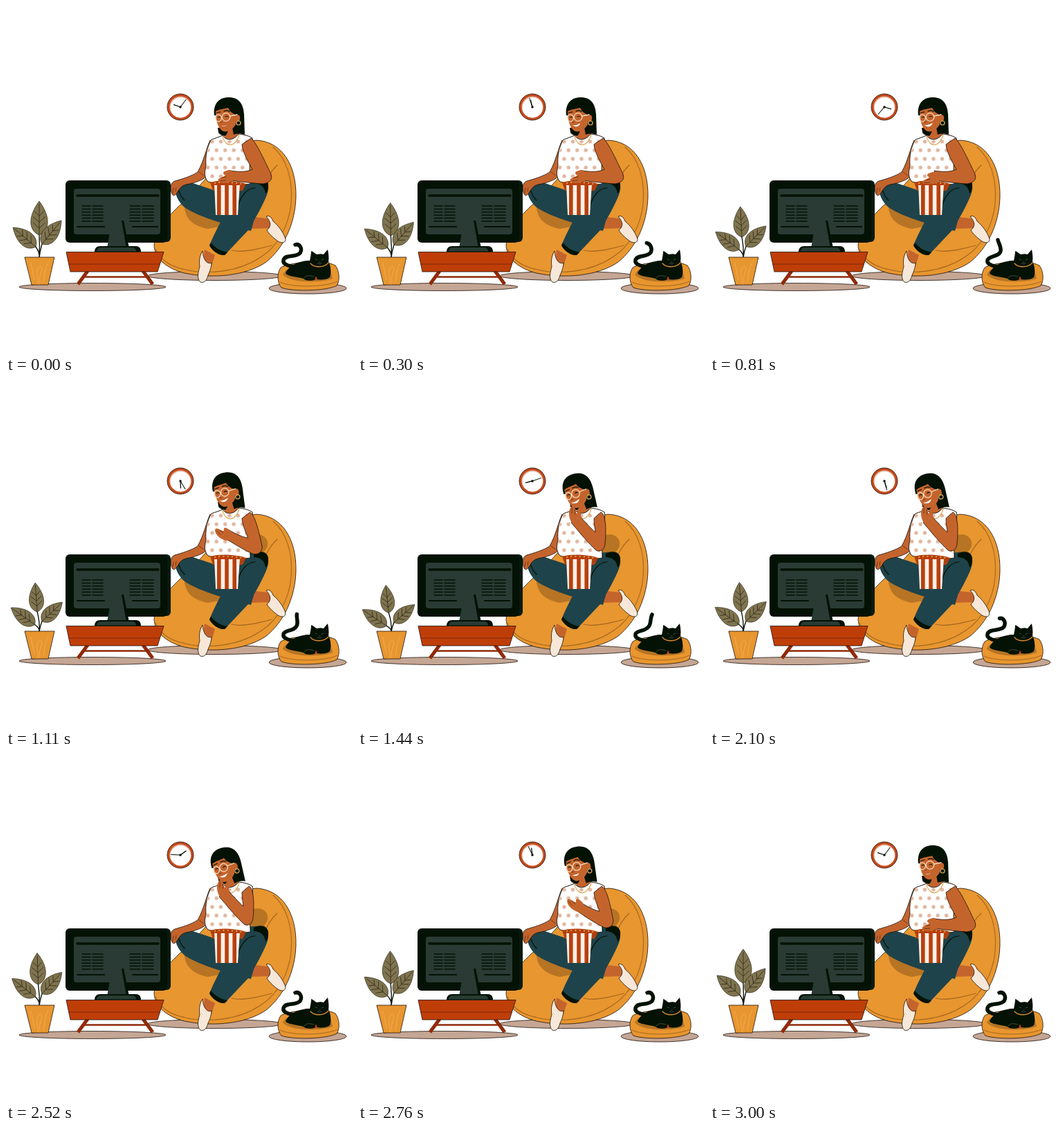
Recreate the animation shown at these times as an HTML page. Size 500 px wide and 500 px high, loop 3.18 s.

```html
<!DOCTYPE html>
<html lang="en">
<head>
<meta charset="utf-8">
<title>Evening at home</title>
<style>
html, body { margin: 0; width: 100%; height: 100%; overflow: hidden; background: #fff; }
svg { display: block; width: 100vw; height: 100vh; }
.edge { stroke: #1c1108; stroke-width: .8; }
.line { fill: none; stroke-linecap: round; stroke-linejoin: round; }
.skin { fill: #c4642d; }
.ink { fill: #031204; }
.bag { fill: #e8962f; }
.jeans { fill: #1e434a; }
.shade { fill: #c5a694; }
.shoe { fill: #f6e7d8; }
.leaf path { vector-effect: non-scaling-stroke; }
</style>
</head>
<body>
<svg viewBox="0 0 500 500">
  <defs>
    <pattern id="dots" width="12.5" height="25" patternUnits="userSpaceOnUse" x="291.700" y="214.700">
      <g fill="#e0b69f">
        <circle cx="6.25" cy="6.25" r="2.7"/>
        <circle cx="0" cy="18.75" r="2.7"/><circle cx="12.5" cy="18.75" r="2.7"/>
      </g>
    </pattern>
    <clipPath id="cup"><path d="M301 257 L338 257 L335 302 L303 302 Z"/></clipPath>
  </defs>

  <g class="shade edge">
    <ellipse cx="125" cy="406" rx="106" ry="5.5"/>
    <ellipse cx="302" cy="390" rx="97" ry="6.5"/>
    <ellipse cx="436" cy="408" rx="56" ry="8"/>
  </g>

  <!-- clock -->
  <circle class="edge" cx="252" cy="146" r="19" fill="#c5481a"/>
  <circle cx="252" cy="146" r="15.6" fill="#e5b9a2"/>
  <circle cx="252.3" cy="146.8" r="14.6" fill="#fff"/>
  <g class="line" stroke="#031204">
    <path id="long" d="M252 146 V132.5" stroke-width="1"/>
    <path id="short" d="M252 146 V136" stroke-width="1.3"/>
  </g>
  <circle class="ink" cx="252" cy="146" r="1.7"/>

  <!-- bean bag -->
  <path class="bag edge" d="M362 194 C399 196 420 230 419 276 C418 314 402 349 376 370 C346 391 296 394 258 386 C234 380 215 366 214 346 C215 324 235 302 260 280 C300 240 330 196 362 194 Z"/>
  <path fill="#b77424" d="M258 291 C259 307 270 318 292 322 L318 317 L318 292 Z"/>
  <path fill="#b77424" d="M357 224 C369 220 380 228 378 239 C376 249 366 254 350 256 Z"/>
  <g class="line" stroke="#a4661f" stroke-width="1.1">
    <path d="M386 204 C405 220 415 250 412 285 C409 318 392 348 368 363 C335 385 290 389 255 380"/>
    <path d="M392 230 C382 239 376 250 372 263"/>
    <path d="M384 346 C362 352 340 357 326 353"/>
    <path d="M216 351 C223 367 236 376 256 380"/>
  </g>

  <!-- plant -->
  <path id="stem" class="line" stroke="#10180c" stroke-width="1.4"/>
  <g id="leaves"></g>
  <path class="edge" fill="#e8962f" d="M27 363 H70 L61 403 H37 Z"/>
  <path class="line" stroke="#f0ad58" stroke-width=".9" d="M36 372 L41 396 M61 371 C55 380 57 388 54 399 M47 402 C44 388 43 378 50 376 C56 380 46 388 49 399"/>

  <!-- bench -->
  <g class="line" stroke="#8f2a08" stroke-width="5">
    <path d="M118 383 L104 402 M198 383 L212 402" stroke-linecap="butt"/>
    <path d="M112 391.500 H205" stroke-width="2.4"/>
  </g>
  <path class="edge" fill="#bf3e08" d="M87 355.500 H228 L219 384 H93 Z"/>
  <path class="line" stroke="#7c260a" stroke-width="1" d="M91 373 H222"/>

  <!-- television -->
  <rect x="94" y="252" width="144" height="89" rx="6" fill="#071a10"/>
  <rect class="ink" x="86" y="252" width="147" height="90" rx="6"/>
  <rect x="98" y="264" width="125" height="66" rx="4" fill="#293b34"/>
  <g class="line" stroke="#031204">
    <path stroke-width="3.4" d="M103 274 H220"/>
    <path stroke-width="2" d="M103 319 H142 M183 319 H219"/>
    <path id="vents" stroke-width="1.5"/>
  </g>
  <path fill="#293b34" d="M153 310 H170 L177 350 H146 Z"/>
  <path class="ink" d="M167 310 H170 L178 350 H174 Z"/>
  <path class="ink" d="M128 355.500 C128 350 131 347 136 347 H188 C193 347 195 351 195 355.500 Z"/>
  <path fill="#293b34" d="M131 354.500 C131 351 134 349 138 349 H181 C186 349 188 351 188 354.500 Z"/>

  <!-- legs -->
  <path class="skin" d="M350 304 L378 307 L386 321 L350 322 Z"/>
  <path class="shoe edge" d="M376 304 C381 302 384 306 386 311 C394 318 401 327 404 337 C404 343 398 343 393 340 C386 335 379 328 377 324 C383 319 384 313 376 304 Z"/>
  <path class="jeans" d="M245 258 C248 250 256 250 264 254 L300 266 L350 266 L360 304 L354 325 C325 318 280 306 258 291 C247 281 243 270 245 258 Z"/>
  <path class="line" stroke="#031204" stroke-width="1.1" d="M250 254 C247 262 250 273 258 281"/>
  <path class="skin" d="M287 352 L302 360 L296 379 L284 374 Z"/>
  <path class="shoe edge" d="M284 354 C279 362 279 370 280 377 C277 386 276 395 281 399 C287 401 290 396 292 389 C295 383 297 376 297 371 C291 374 285 367 284 354 Z"/>
  <path class="jeans" d="M320 258 C340 251 360 247 373 249 C381 253 380 266 377 273 C371 288 361 306 350 324 L316 360 C308 361 298 354 294 346 C301 329 311 309 320 296 Z"/>
  <path class="ink" d="M358 251 C368 246 378 248 379 258 C379 266 377 270 375 271 C374 261 367 256 358 256 Z"/>
  <path class="line" stroke="#031204" stroke-width="1.2" d="M335 290 C339 274 349 263 360 263"/>
  <path class="ink" d="M296 342 C302 349 309 354 320 356 L316 360 C308 361 298 354 294 346 Z"/>

  <!-- resting arm -->
  <path class="skin edge" d="M295 194 C290 204 286 224 277 240 C268 246 254 250 244 253 C238 255 237 262 239 269 C240 275 244 275 247 270 C250 266 252 260 260 258 C273 256 286 251 291 245 C296 234 302 215 303 200 Z"/>
  <path class="line" stroke="#6a3112" stroke-width=".8" d="M279 240 L286 245 M242 263 L241 270 M246 262 L245 268"/>

  <!-- torso -->
  <path class="ink" d="M306 176 H330 V184 C324 190 311 189 307 183 Z"/>
  <path class="skin" d="M321 176 L335 173 L338 191 C330 200 319 198 313 190 C318 188 321 184 321 176 Z"/>
  <path id="top" class="edge" fill="#fff" d="M297 193 C303 191 309 189 313 187 C318 195 329 195 336 185 C343 186 350 187 356 191 C358 204 353 218 352 232 L353 257 C333 260 312 259 292 254 C286 247 287 240 289 232 C288 218 290 204 297 193 Z"/>
  <use href="#top" style="fill: url(#dots)"/>
  <path fill="url(#dots)" d="M297 193 L314 188 C319 196 329 196 336 187 L355 191 C358 204 353 218 352 232 L352 256 C333 259 312 258 292 253 C287 247 287 240 289 232 C288 218 290 204 297 193 Z"/>
  <path class="line" stroke="#dba657" stroke-width="1.2" d="M313 188 C315 199 323 203 329 199 C334 195 336 190 337 186"/>

  <!-- head -->
  <g id="head">
    <path class="ink" d="M301 158 C299 142 307 132 322 132 C337 132 343 142 344 156 L345 186 C340 184 334 184 329 186 L324 160 Z"/>
    <path class="skin" d="M303 151 C309 147 316 147 322 145 C329 149 332 155 334 160 L332 171 C328 178 321 183 314 181 C307 178 303 167 303 151 Z"/>
    <ellipse class="skin" cx="335" cy="162" rx="3.2" ry="4.800"/>
    <path class="ink" d="M301 153 C304 142 314 138 322 142 C328 146 333 151 333 158 C327 155 323 152 321 147 C314 149 308 149 301 153 Z"/>
    <g class="line">
      <path stroke="#031204" stroke-width="1.2" d="M304.500 154.500 L310 153 M315 152 Q319 150 323 152.500"/>
      <path stroke="#031204" stroke-width="1" d="M306 161 Q308 159 310 161 M317 160 Q319 158 321 160"/>
      <path stroke="#7b3513" stroke-width=".9" d="M312 161 L310 168 L312.500 168"/>
      <g stroke="#f3d9b8" stroke-width="1.3">
        <ellipse cx="307" cy="162" rx="4.400" ry="5.200"/>
        <circle cx="318" cy="160.500" r="5.800"/>
        <path d="M311.500 161.500 L312.500 161 M324 159 L334 157"/>
      </g>
      <circle cx="336" cy="169" r="3" stroke="#e1b068" stroke-width="1.2"/>
    </g>
    <path id="smile" fill="#fff"/>
  </g>

  <!-- popcorn and eating arm -->
  <path fill="#b23f0d" d="M295 255 C307 251 333 252 347 257 L342 267 H299 Z"/>
  <path class="line" stroke="#e39a42" stroke-width="2.2" stroke-dasharray=".2 6" d="M302 256 C312 254 330 255 340 257"/>
  <path id="arm" class="skin edge"/>
  <g id="hand">
    <path class="skin" d="M-5 -7 C2 -9 9 -8 14 -5 C18 -2 20 1 18 3 C14 5 9 2 6 4 C9 7 7 10 3 9 C-2 8 -5 7 -5 5 Z"/>
    <path class="line" stroke="#6a3112" stroke-width=".8" d="M9 -3 L16 0 M6 1 L12 2.500"/>
  </g>
  <g clip-path="url(#cup)">
    <rect x="298" y="256" width="42" height="47" fill="#fbf0e6"/>
    <path id="stripes" fill="#b8400f"/>
  </g>

  <!-- cat -->
  <path class="bag edge" d="M397 378 C410 370 461 366 476 375 C482 383 483 397 478 404 C464 412 414 413 398 407 C391 399 392 385 397 378 Z"/>
  <path fill="#b77424" d="M400 388 C409 400 452 401 472 394 L469 382 L405 381 Z"/>
  <path class="line" stroke="#a4661f" stroke-width="1" d="M396 399 C412 407 460 407 479 398"/>
  <path id="tail" class="line" stroke="#031204" stroke-width="5.5"/>
  <path class="ink" d="M404 386 C408 376 422 368 439 368 C440 363 441 358 441 354 C444 355 447 358 449 359 C453 358 456 358 459 359 C461 356 463 354 465 352 C466 358 467 364 466 369 C470 377 470 387 468 392 C463 396 455 396 450 395 C440 398 432 397 430 394 C420 391 407 391 404 386 Z"/>
  <path class="line" stroke="#d98a2d" stroke-width="1.3" d="M440 372 C445 378 459 379 466 371"/>
  <path class="line" stroke="#4d5a50" stroke-width=".8" d="M431 393 C433 389 439 389 445 391 M447 366 L449.500 367 M456 367 L459 366 M452 370 L454 370 M450 372 Q453 374 456 372"/>
  <path fill="#c74711" d="M448 390 L450 396 L446 396 Z"/>
</svg>

<script>
const LOOP = 3180, STEP = 30, MOVES = 100;
const el = id => document.getElementById(id);
const set = (id, name, value) => el(id).setAttribute(name, value);
const lerp = (a, b, k) => a + (b - a) * k;
const ease = k => { k = Math.min(1, Math.max(0, k)); return k * k * (3 - 2 * k); };

// Blends two paths that share one structure.
function blend(a, b, k) {
  const nums = b.match(/-?[\d.]+/g);
  let i = 0;
  return a.replace(/-?[\d.]+/g, n => lerp(+n, +nums[i++], k).toFixed(2));
}

// Finds the value at time k in rows of [time, value].
function at(rows, k, mix = lerp) {
  let i = 1;
  while (i < rows.length - 1 && k > rows[i][0]) i++;
  const [t0, a] = rows[i - 1], [t1, b] = rows[i];
  return mix(a, b, (k - t0) / (t1 - t0));
}

// One there-and-back swing drives both the clock and the plant.
const swing = [[0, 0], [.1, .155], [.525, 1], [.7, .65], [1, 0]];
const grin = [[0, .1], [.1, .8], [.27, 1], [.84, .9], [1, .1]];

const tailRoot = 'M428 377 C412 378 399 374 401 367 ';
const curl = tailRoot + 'C404 358 419 364 425 357 C429 350 424 343 418 345';
const lift = tailRoot + 'C404 360 418 363 420 354 C421 348 417 343 416 338';
const lean = tailRoot + 'C404 361 416 364 421 355 C424 349 422 344 425 339';
const wag = [[0, curl], [.27, lift], [.48, lean], [.72, curl], [1, curl]];

const armDown = 'M354 191 C362 198 371 218 383 243 C386 251 380 256 371 257 C355 256 340 254 326 252 L324 238 C338 240 347 240 356 236 C350 225 342 212 341 200 Z';
const armUp = 'M351 191 C358 194 359 215 357 237 C356 245 351 249 344 246 C333 236 319 219 308 206 L319 195 C329 206 336 214 343 220 C342 212 341 206 341 200 Z';

// Leaf rows: base x, y and tip x, y at both ends of the swing.
const leaves = [
  [[48, 331, 48, 282], [44, 337, 39.5, 298]],
  [[43, 348, 10, 320], [41, 356, 6, 333]],
  [[52, 344, 80, 310], [52, 351, 82, 326]]
];
el('leaves').innerHTML = leaves.map(() => `<g class="leaf">
  <path fill="#7f744f" stroke="#2b2616" stroke-width=".7" d="M0 0 C-.3 -.12 -.36 -.52 0 -1 C.36 -.52 .3 -.12 0 0 Z"/>
  <path class="line" stroke="#2b2616" stroke-width=".8" d="M0 0 V-.92 M-.17 -.36 L0 -.2 L.17 -.36 M-.18 -.54 L0 -.38 L.18 -.54 M-.13 -.7 L0 -.56 L.13 -.7"/></g>`).join('');
const leafNodes = [...el('leaves').children];

let vents = '';
for (let y = 289; y < 313; y += 4.4)
  vents += `M110 ${y} H122 M125 ${y} H140 M179 ${y} H194 M197 ${y} H213 `;
set('vents', 'd', vents);

let stripes = 'M298 256 H340 V259 H298 Z ';
for (let x = 305; x < 335; x += 11.2) stripes += `M${x} 256 h5.6 v47 h-5.6 Z `;
set('stripes', 'd', stripes);

function draw(k) {
  const sway = at(swing, k);
  const up = ease((k - .28) / .18) * (1 - ease((k - .85) / .15));
  const dip = 3 * ease((k - .12) / .14) * (1 - up);

  const bases = leaves.map(([a, b], i) => {
    const [x, y, tx, ty] = a.map((v, j) => lerp(v, b[j], sway));
    const size = Math.hypot(tx - x, ty - y);
    const angle = Math.atan2(tx - x, y - ty) * 180 / Math.PI;
    leafNodes[i].setAttribute('transform', `translate(${x} ${y}) rotate(${angle}) scale(${size})`);
    return [x, y];
  });
  set('stem', 'd', bases.map(([x, y]) => `M48 364 Q49 ${(y + 364) / 2} ${x} ${y}`).join(' '));

  const angle = 37 - 358 * sway;
  set('long', 'transform', `rotate(${angle} 252 146)`);
  set('short', 'transform', `rotate(${327 - angle} 252 146)`);

  set('tail', 'd', at(wag, k, blend));
  set('head', 'transform', `rotate(${-11 * up} 335 180)`);
  set('smile', 'd', blend('M311 173 Q315 174 319 172 Q316 175 311 173 Z', 'M309 172 Q315 173 322 169 Q318 178 309 172 Z', at(grin, k)));

  set('arm', 'd', blend(armDown, armUp, up));
  const x = lerp(324, 314.5, up), y = lerp(245, 200, up) + (k < .5 ? dip : 0);
  set('hand', 'transform', `translate(${x} ${y}) rotate(${lerp(152, 252, up)})`);
}

const start = performance.now();
function tick() {
  const time = (performance.now() - start) % LOOP;
  draw(Math.min(MOVES, Math.floor(time / STEP)) / MOVES);
  requestAnimationFrame(tick);
}
tick();
</script>
</body>
</html>
```
